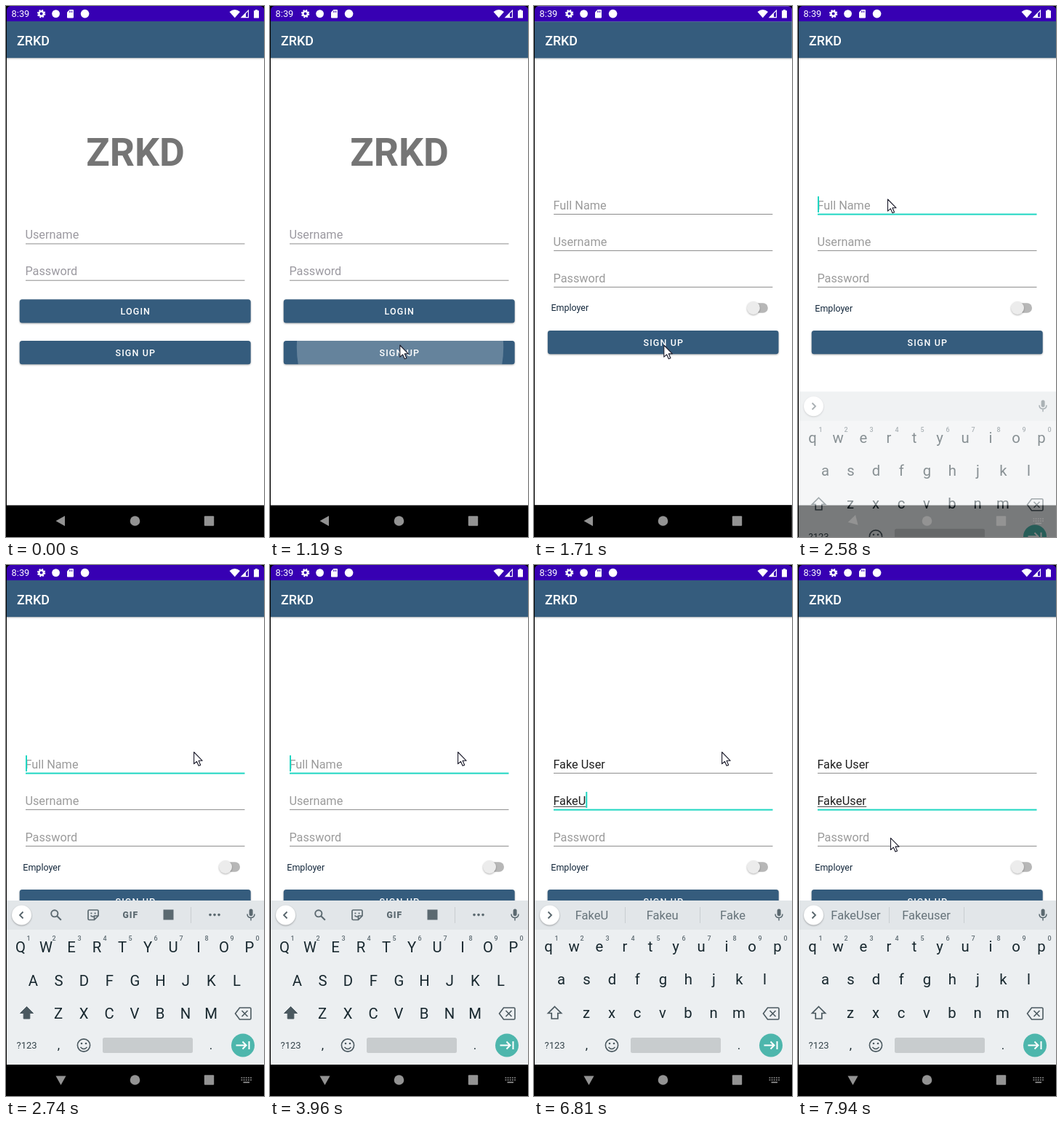
Write an HTML page that moves like this. It is 355 px wide and 728 px high and loops after 8 s.

```html
<!DOCTYPE html>
<html lang="en">
<head>
<meta charset="utf-8">
<title>Sign up</title>
<style>
html, body { margin: 0; width: 100%; height: 100%; overflow: hidden; background: #000; }
svg { display: block; width: 100%; height: 100%; }
text { font-family: Roboto, sans-serif; white-space: pre; }
.btn { filter: drop-shadow(0 1px 1px rgba(0,0,0,.3)); }
</style>
</head>
<body>
<svg id="stage" viewBox="0 0 355 728"></svg>
<script>
const BLUE = '#355c7d', TEAL = '#1fd6c2', ICON = '#5b6970', KEY = '#17272e';
const APP = 'ZRKD', LOOP = 8000;
const stage = document.getElementById('stage');

// markup helpers
const rect = (x, y, w, h, fill, more = '') =>
  `<rect x="${x}" y="${y}" width="${w}" height="${h}" fill="${fill}" ${more}/>`;
const circle = (x, y, r, fill, more = '') =>
  `<circle cx="${x}" cy="${y}" r="${r}" fill="${fill}" ${more}/>`;
const path = (d, fill, more = '') => `<path d="${d}" fill="${fill}" ${more}/>`;
const line = (d, color, w = 1.6, more = '') =>
  path(d, 'none', `stroke="${color}" stroke-width="${w}" ${more}`);
const text = (x, y, s, size, fill, more = '') =>
  `<text x="${x}" y="${y}" font-size="${size}" fill="${fill}" ${more}>${s}</text>`;
const mid = (x, y, s, size, fill, more = '') =>
  text(x, y, s, size, fill, 'text-anchor="middle" ' + more);
const group = (id, body, more = '') => `<g id="${id}" ${more}>${body}</g>`;

const button = (y, label) =>
  rect(18.7, y, 318, 32.3, BLUE, 'rx="3.5" class="btn"') +
  mid(178.3, y + 20.9, label, 12.5, '#fff', 'font-weight="500" letter-spacing="1.12"');

const frame = body =>
  rect(0, 0, 355, 728, '#fff') +
  rect(0, 71, 355, 1, '#000', 'opacity=".2"') + rect(0, 72, 355, 1.5, '#000', 'opacity=".07"') +
  rect(0, 0, 355, 21.2, '#3700b3') + rect(0, 21, 355, 50.2, BLUE) +
  text(15, 53.8, APP, 17.9, '#fff', 'font-weight="500"') +
  body + rect(0, 684.5, 355, 44, '#000');

const hintField = (y, label) =>
  text(26.4, y, label, 16.3, '#9b99a0') + rect(27, y + 6.3, 301.5, 1, '#8c8c8c');

const login = frame(
  mid(178, 219.3, APP, 53.6, '#757575', 'font-weight="700"') +
  hintField(319.2, 'Username') + hintField(369.4, 'Password') +
  button(402.3, 'LOGIN') + button(459, 'SIGN UP') +
  '<clipPath id="cut"><rect x="18.7" y="459" width="318" height="32.3" rx="3.5"/></clipPath>' +
  circle(179, 468, 0, '#fff', 'id="ripple" clip-path="url(#cut)"'));

const baseY = [278.6, 328.6, 378.6];
const editField = (label, i) => {
  const y = baseY[i];
  return text(26.4, y, label, 16.3, '#9b9b9b', `id="hint${i}"`) +
    text(26.4, y, '', 16.3, '#1f1f1f', `id="value${i}"`) +
    rect(27, y + 2.2, 0, 1, '#3a3a3a', `id="mark${i}"`) +
    rect(27, y + 6.3, 301.5, 1, '#8c8c8c', `id="rule${i}"`);
};

const signup = frame(
  ['Full Name', 'Username', 'Password'].map(editField).join('') +
  rect(27, 261, 2, 22, TEAL, 'id="caret"') +
  text(23.3, 418.5, 'Employer', 12.5, '#14283c') +
  rect(297, 407.3, 25, 13.4, '#b7b7b7', 'rx="6.7"') +
  circle(302, 414, 9, '#ececec', 'class="btn"') +
  button(445, 'SIGN UP'));

// keyboard
const rows = [['qwertyuiop', 20, 529.8], ['asdfghjkl', 37.4, 575], ['zxcvbnm', 72, 620.5]];
const letters = upper => rows.map(([keys, x, y]) => [...keys].map((k, i) =>
  mid(x + 35 * i, y + (upper ? 1.6 : 0), upper ? k.toUpperCase() : k, 20.3, KEY)).join('')).join('');
const digits = [...'1234567890'].map((d, i) =>
  mid(31 + 35 * i, 514.8, d, 9, '#5f6c73', 'font-weight="500"')).join('');
const shiftShape = 'M28.5 605.5L37.5 614.5H32.8V622H24.2V614.5H19.5Z';
const divider = x => rect(x, 469, 1, 22, '#c9ced1');

const tools =
  circle(66.8, 477.8, 4.6, 'none', `stroke="${ICON}" stroke-width="1.9"`) +
  line('M70.2 481.2L75.8 486.8', ICON, 2.1) +
  line('M114.5 473H125.5Q127 473 127 474.5V481L121.5 486.5H114.5Q113 486.5 113 485V474.5Q113 473 114.5 473ZM127 481H121.5V486.5M116.5 480.5Q119.5 484 123 480.5', ICON, 1.7) +
  circle(117.4, 477.5, 1.1, ICON) + circle(122.6, 477.5, 1.1, ICON) +
  mid(171.4, 483.5, 'GIF', 12.2, ICON, 'font-weight="900" letter-spacing="1"') +
  rect(216.5, 472.5, 14, 14, ICON) + divider(254) +
  [281, 287, 293].map(x => circle(x, 479.6, 1.8, ICON)).join('');

const keyboard =
  rect(0, 460, 355, 225, '#eceff1') + rect(0, 460, 355, 40, '#e2e6e9') +
  circle(21.5, 480, 13.5, '#fff', 'class="btn"') +
  line('', '#56646b', 1.8, 'id="chevron"') +
  group('tools', tools) +
  group('words', divider(125) + divider(228) +
    [79.5, 176.6, 273.5].map((x, i) => mid(x, 485.8, '', 16.5, '#66737a', `id="word${i}"`)).join('')) +
  rect(334.6, 471.5, 5, 9.8, ICON, 'rx="2.5"') +
  line('M332 478.5Q332 483.5 337 483.5T342 478.5M337 483.5V487.5', ICON, 1.5) +
  digits +
  group('lower', letters(false) + line(shiftShape, '#4b5960', 1.7)) +
  group('upper', letters(true) + path(shiftShape, '#4b5960', 'stroke="#4b5960"')) +
  line('M321.5 607H335.5Q337 607 337 608.5V621.5Q337 623 335.5 623H321.5L315.5 615ZM324.5 611L332.5 619M332.5 611L324.5 619', '#4b5960', 1.6) +
  mid(28.6, 663, '?123', 13, '#34434a') + mid(72.5, 664, ',', 17, KEY) + mid(282, 664, '.', 17, KEY) +
  circle(107, 658.5, 8.6, 'none', 'stroke="#4b5960" stroke-width="1.6"') +
  circle(104, 656, 1.3, '#4b5960') + circle(110, 656, 1.3, '#4b5960') +
  line('M102.5 661Q107 666 111.5 661', '#4b5960', 1.5) +
  rect(133, 648, 124, 21, '#c8ccce', 'rx="2.5"') +
  circle(326, 658.5, 16, '#4db6ac') +
  line('M316.5 658.5H330M325.5 653.5L330.5 658.5L325.5 663.5M334.5 653V664', '#fff', 2);

const statusBar =
  text(7.6, 15.4, '8:39', 12.8, '#fff') +
  circle(48.6, 10.6, 3.2, 'none', 'stroke="#fff" stroke-width="2.4"') +
  circle(48.6, 10.6, 4.8, 'none', 'stroke="#fff" stroke-width="1.8" stroke-dasharray="2.1 1.67"') +
  circle(68.6, 10.6, 5.4, '#fff') +
  path('M87.5 5H92Q93 5 93 6V15.5Q93 16.5 92 16.5H85Q84 16.5 84 15.5V8.5Z', '#fff') +
  line('M87.5 6.5V9M89.3 6.5V9M91.1 6.5V9', '#3700b3', 0.8) +
  circle(108.6, 10.6, 5.8, '#fff') +
  path('M307.5 8Q314.8 2 322 8L314.8 16.3Z', '#fff') +
  line('M324 15.6H333.5V6Z', '#fff', 1.1) + path('M324 15.6H330V9.5Z', '#fff') +
  path('M341 6.3H343V5H346V6.3H348V16.5H341Z', '#fff');

const GREY = '#939393';
const navBar =
  path('M-7 0L5.5 -7V7Z', GREY, 'id="back"') +
  circle(177.5, 706, 6.8, GREY) + rect(272.8, 699.3, 13.4, 13.4, GREY, 'rx="1"') +
  group('imeKey', rect(323.5, 701.5, 14.5, 9.5, 'none') +
    line('M323.5 703H338M323.5 706H338', GREY, 1.7, 'stroke-dasharray="1.8 1.35"') +
    line('M326.5 709.3H335', GREY, 1.7));

const pointer = path('M0 0V16.2L3.8 12.8L6.5 18.8L9.1 17.7L6.5 11.8H11.6Z', '#fff',
  'id="pointer" stroke="#1a1a2a" stroke-width="1.1" stroke-linejoin="round"');

stage.innerHTML = rect(0, 0, 355, 728, '#000') +
  group('login', login) + group('signup', signup) + group('keyboard', keyboard) +
  navBar + statusBar +
  rect(0, 0, 1, 728, '#000') + path('M0 0H6Q1 1 1 6V10H0ZM355 0H350Q355 1 355 5Z', '#000') + pointer;

const ui = {};
stage.querySelectorAll('[id]').forEach(n => ui[n.id] = n);
const set = (id, props) => { for (const k in props) ui[id].setAttribute(k, props[k]); };
const show = (id, on) => ui[id].setAttribute('display', on ? 'inline' : 'none');
const write = (id, s) => { if (ui[id].textContent !== s) ui[id].textContent = s; };

// motion helpers
const clamp = v => Math.min(1, Math.max(0, v));
const span = (t, a, b) => clamp((t - a) / (b - a));
const easeOut = u => 1 - (1 - u) ** 2;
const easeBoth = u => u * u * (3 - 2 * u);
const cubic = (a, b, c, d, s) => {
  const r = 1 - s;
  return a * r * r * r + 3 * b * r * r * s + 3 * c * r * s * s + d * s * s * s;
};
// two joined Bezier pieces: quick start, very slow finish
function windowEase(u) {
  const [xs, ys] = u < 1 / 6
    ? [[0, .05, .1333, 1 / 6], [0, 0, .06, .4]]
    : [[1 / 6, .2083, .25, 1], [.4, .82, 1, 1]];
  let lo = 0, hi = 1;
  for (let i = 0; i < 24; i++) {
    const m = (lo + hi) / 2;
    if (cubic(...xs, m) < u) lo = m; else hi = m;
  }
  return cubic(...ys, lo);
}
const zoom = k => `translate(178 364) scale(${k}) translate(-178 -364)`;

// start, end, x, y reached, easing
const moves = [
  [400, 830, 178.5, 461, easeOut],
  [1060, 1140, 178.8, 465, easeBoth],
  [1870, 2400, 123.5, 265, easeBoth],
  [2590, 2740, 258.6, 256.5, easeBoth],
  [7540, 7940, 127.5, 374.3, easeBoth]
];
function pointerAt(t) {
  let x = 334, y = 722;
  for (const [a, b, tx, ty, ease] of moves) {
    const p = ease(span(t, a, b));
    x += (tx - x) * p;
    y += (ty - y) * p;
  }
  return [x, y];
}

// time, field, text, suggestions
const steps = [
  [2520, 0, '', ''],
  [3990, 0, 'F', 'F|For|From'],
  [4100, 0, 'Fa', 'Fa|Far|Fast'],
  [4190, 0, 'Fak', 'Fak|Fake|Far'],
  [4280, 0, 'Fake', 'Fake|Faked|Fakes'],
  [4360, 0, 'Fake ', 'and|it|or'],
  [4810, 0, 'Fake U', 'U|Up|Us'],
  [4970, 0, 'Fake Us', 'Us|Use|User'],
  [5030, 0, 'Fake Use', 'Use|User|Used'],
  [5080, 0, 'Fake User', 'User|Username|Users'],
  [5240, 1, '', ''],
  [6140, 1, 'F', 'F|For|From'],
  [6240, 1, 'Fa', 'Fa|Far|Fast'],
  [6340, 1, 'Fak', 'Fak|Fake|Far'],
  [6440, 1, 'Fake', 'Fake|Faked|Fakes'],
  [6810, 1, 'FakeU', 'FakeU|Fakeu|Fake'],
  [7010, 1, 'FakeUs', 'FakeUs|Fakeus|Fake'],
  [7130, 1, 'FakeUse', 'FakeUse|Fakeuse|'],
  [7260, 1, 'FakeUser', 'FakeUser|Fakeuser|']
];

function drawForm(t) {
  const now = steps.filter(s => s[0] <= t).pop();
  const [since, focus, typed, hints] = now || [0, -1, '', ''];
  const values = focus === 1 ? ['Fake User', typed, ''] : [typed, '', ''];
  values.forEach((v, i) => {
    const on = i === focus;
    write('value' + i, v);
    show('hint' + i, !v);
    set('rule' + i, { fill: on ? TEAL : '#8c8c8c', height: on ? 2 : 1, y: baseY[i] + (on ? 6 : 6.3) });
    const start = v.lastIndexOf(' ') + 1, node = ui['value' + i];
    const composing = on && start < v.length;
    show('mark' + i, composing);
    if (composing) {
      const before = start ? node.getSubStringLength(0, start) : 0;
      set('mark' + i, { x: 26.8 + before, width: node.getComputedTextLength() - before });
    }
  });
  show('caret', focus >= 0 && Math.floor((t - since) / 500) % 2 === 0);
  if (focus >= 0) {
    const w = typed ? ui['value' + focus].getComputedTextLength() : 0;
    set('caret', { x: 27 + Math.max(0, w - .6), y: 261 + 50 * focus });
  }
  show('words', hints);
  const words = hints.split('|');
  for (let i = 0; i < 3; i++) write('word' + i, words[i] || '');
}

function drawKeyboard(t) {
  const p = easeOut(span(t, 2540, 2677));
  show('keyboard', p > 0);
  set('keyboard', { opacity: p, transform: `translate(0 ${140 * (1 - p)})` });
  const caps = t >= 2710 && t < 3990;
  const toolbar = t >= 2740 && t < 3990 || t >= 5360 && t < 6140;
  show('upper', caps);
  show('lower', !caps);
  show('tools', toolbar);
  set('chevron', { d: toolbar ? 'M23.5 475.5L19 480L23.5 484.5' : 'M19.5 475.5L24 480L19.5 484.5' });
  show('imeKey', t >= 2560);
  set('back', { transform: `translate(75.5 706) rotate(${-90 * easeBoth(span(t, 2540, 2700))})` });
}

function drawWindows(t) {
  const held = 1470 + Math.floor((t - 1470) / 40) * 40;
  const u = span(held, 1401, 1801), p = windowEase(u);
  show('login', u < 1);
  show('signup', u > 0);
  set('login', { transform: zoom(1 + .05 * p) });
  set('signup', { transform: zoom(.85 + .15 * p), opacity: span(held, 1451, 1501) });
  set('ripple', {
    r: 20 + 150 * easeOut(span(t, 1060, 1290)),
    opacity: .24 * span(t, 1050, 1120) * (1 - span(t, 1350, 1550))
  });
}

function draw(t) {
  drawWindows(t);
  drawForm(t);
  drawKeyboard(t);
  const [x, y] = pointerAt(t);
  show('pointer', t >= 400);
  set('pointer', { transform: `translate(${x} ${y})` });
}

const begin = performance.now();
function tick() {
  draw((performance.now() - begin) % LOOP);
  requestAnimationFrame(tick);
}
tick();
</script>
</body>
</html>
```
